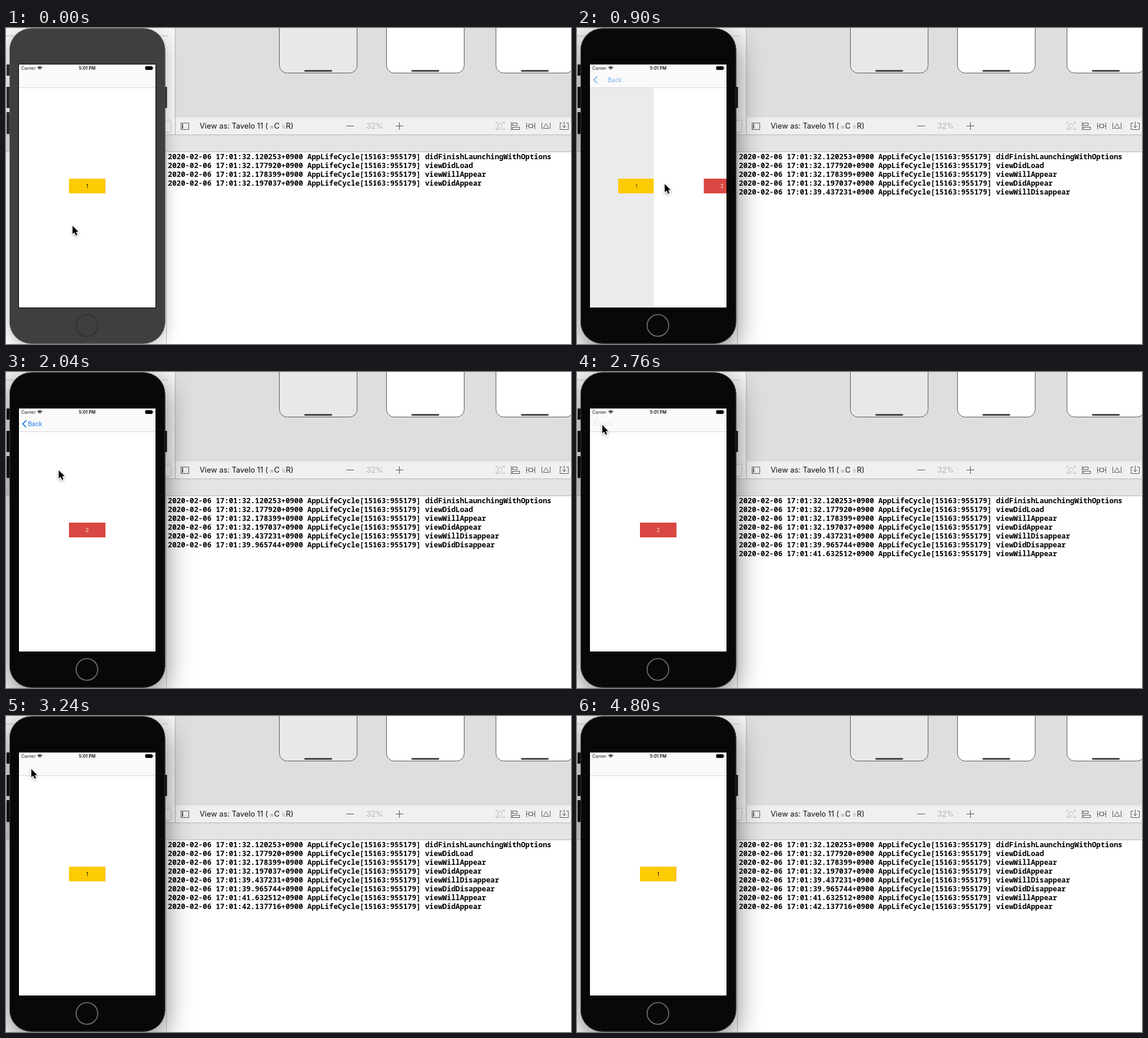
Animation of 960x537 px, one loop 4.86 s. Source, as an HTML page with a canvas:

```html
<!DOCTYPE html>
<html lang="en">
<head>
<meta charset="utf-8">
<title>View life cycle</title>
<style>
html, body { margin: 0; width: 100%; height: 100%; overflow: hidden; background: #fff; }
canvas { display: block; width: 960px; height: 537px; }
</style>
</head>
<body>
<canvas id="stage" width="960" height="537"></canvas>
<script>
const ctx = document.getElementById('stage').getContext('2d');
const LOOP = 4860, STEP = 60;
const SANS = 'Inter, Roboto, "Liberation Sans", sans-serif';
const MONO = '"Noto Sans Mono", "DejaVu Sans Mono", monospace';
const SCREEN = { x: 22, y: 62, w: 232, h: 413 };

const ACTIVATE = 660, PUSH = 808, PRESS = 2640, POP = 2788, POP_END = 3240;
const LOG = [
  [0, '32.120253', 'didFinishLaunchingWithOptions'],
  [0, '32.177920', 'viewDidLoad'],
  [0, '32.178399', 'viewWillAppear'],
  [0, '32.197037', 'viewDidAppear'],
  [780, '39.437231', 'viewWillDisappear'],
  [1260, '39.965744', 'viewDidDisappear'],
  [2760, '41.632512', 'viewWillAppear'],
  [3240, '42.137716', 'viewDidAppear']
];

const clamp = v => Math.max(0, Math.min(1, v));
const mix = (a, b, k) => a + (b - a) * k;
const smooth = k => k * k * (3 - 2 * k);

// critically damped spring, 0 to 1
function spring(ms) {
  const x = Math.max(0, ms) * 0.0194;
  return 1 - (1 + x) * Math.exp(-x);
}

function rect(x, y, w, h, color) {
  ctx.fillStyle = color;
  ctx.fillRect(x, y, w, h);
}

function round(x, y, w, h, r, fill, stroke, width = 1) {
  ctx.beginPath();
  ctx.roundRect(x, y, w, h, r);
  if (fill) { ctx.fillStyle = fill; ctx.fill(); }
  if (stroke) { ctx.strokeStyle = stroke; ctx.lineWidth = width; ctx.stroke(); }
}

function line(points, color, width = 1) {
  ctx.beginPath();
  points.forEach(([x, y], i) => i ? ctx.lineTo(x, y) : ctx.moveTo(x, y));
  ctx.strokeStyle = color;
  ctx.lineWidth = width;
  ctx.stroke();
}

function box(x, y, w, h, color) {
  ctx.strokeStyle = color;
  ctx.lineWidth = 1;
  ctx.strokeRect(x, y, w, h);
}

function text(str, x, y, font, color, align = 'left') {
  ctx.font = font;
  ctx.fillStyle = color;
  ctx.textAlign = align;
  ctx.fillText(str, x, y);
}

function icons() {
  const dark = '#5c5c5c', pale = '#b4b4b4';
  box(297.5, 161.5, 13, 11, dark);
  rect(299, 163, 2, 8, dark);

  line([[578, 166.5], [591, 166.5]], '#555');
  line([[662, 166.5], [675, 166.5]], '#555');
  line([[668.5, 160], [668.5, 173]], '#555');

  for (const sx of [-1, 1]) for (const sy of [-1, 1]) {
    const x = 839.5 + sx * 7, y = 166.5 + sy * 6;
    line([[x - sx * 4, y], [x, y], [x, y - sy * 3]], pale);
  }
  ctx.beginPath();
  ctx.arc(839.5, 166.5, 3.8, 0.9, 6.3);
  ctx.stroke();
  line([[836, 170], [834, 173]], pale);

  line([[858.5, 160], [858.5, 174]], dark);
  box(860.5, 161.5, 8, 4, dark);
  box(860.5, 168.5, 12, 4, dark);

  for (const x of [884.5, 898.5]) line([[x, 161], [x, 172]], dark);
  box(888.5, 163.5, 6, 6, dark);
  line([[885, 166.5], [888, 166.5]], dark);
  line([[895, 166.5], [898, 166.5]], dark);

  for (const x of [910.5, 924.5]) line([[x, 161], [x, 172]], dark);
  line([[913, 170.5], [917.5, 162.5], [922, 170.5], [913, 170.5]], dark);

  line([[945, 161.5], [941.5, 161.5], [941.5, 172.5], [955.5, 172.5], [955.5, 161.5], [952, 161.5]], dark);
  line([[948.5, 159], [948.5, 169]], dark);
  line([[945, 166], [948.5, 169.5], [952, 166]], dark);
}

function editor(t) {
  rect(0, 0, 960, 537, '#fff');
  rect(0, 0, 288, 181, '#f5f5f5');
  rect(0, 13, 277, 1, '#c4c4c4');
  round(240.5, 156.5, 40, 21, 3, '#f7f7f7', '#c4c4c4');
  rect(288, 0, 672, 152, '#dedede');
  rect(288, 152, 672, 29, '#f0f0f0');
  rect(287, 0, 1, 181, '#b4b4b4');

  [[464.5, '#e8e8e8'], [646.5, '#fff'], [832.5, '#fff']].forEach(([x, fill]) => {
    round(x, -40, 132, 116.5, 13, fill, '#5a5a5a');
    round(x + 42.5, 71.6, 47, 2.6, 1.3, '#333');
  });

  const label = '12.8px ' + SANS, small = '9px ' + SANS;
  text('View as: Tavelo 11 (', 329, 171, label, '#111');
  text('w', 448, 171, small, '#999');
  text('C', 455.5, 171, label, '#111');
  text('h', 469.5, 171, small, '#999');
  text('R)', 475.5, 171, label, '#111');
  text('32%', 626.5, 171, label, '#b0b0b0', 'center');
  icons();

  rect(0, 181, 960, 30, '#e4e4e4');
  rect(0, 181, 960, 1, '#b8b8b8');
  rect(0, 210, 960, 1, '#b8b8b8');
  rect(272, 211, 1, 326, '#c2c2c2');

  LOG.forEach(([at, stamp, name], i) => {
    if (t < at) return;
    text(`2020-02-06 17:01:${stamp}+0900 AppLifeCycle[15163:955179] ${name}`,
      275, 223 + i * 15, 'bold 12.35px ' + MONO, '#000');
  });
}

function phoneBody(active) {
  const body = active ? '#080808' : '#3f3f3f';
  const keys = active ? '#111' : '#2c2c2c';
  rect(1, 62, 5, 19, keys);
  rect(1, 100, 5, 36, keys);
  rect(1, 143, 5, 37, keys);
  rect(270, 100, 3.5, 36, keys);

  ctx.save();
  ctx.shadowColor = active ? 'rgba(0,0,0,.5)' : 'rgba(0,0,0,.25)';
  ctx.shadowBlur = active ? 46 : 26;
  ctx.shadowOffsetY = active ? 14 : 8;
  round(6, 0.5, 264.5, 536, 37, body);
  ctx.restore();
  round(6.5, 1, 263.5, 535, 36.5, null, active ? '#3a3a3a' : '#555');

  ctx.beginPath();
  ctx.arc(137.5, 505.5, 18.4, 0, 7);
  ctx.strokeStyle = active ? '#6a6a6a' : '#2c2c2c';
  ctx.lineWidth = active ? 1.8 : 1.2;
  ctx.stroke();
  rect(21, 61, 234, 415, '#000');
}

function button(x, fill, edge, label, color) {
  rect(x, 256, 62, 25, fill);
  rect(x + 61, 256, 1, 25, edge);
  text(label, x + 31, 271.7, '9px ' + SANS, color, 'center');
}

function statusBar() {
  text('Carrier', 26, 71.2, '7.3px ' + SANS, '#111');
  text('5:01 PM', 138, 71.2, '600 7.4px ' + SANS, '#111', 'center');
  ctx.strokeStyle = '#111';
  ctx.lineWidth = 1.3;
  for (const r of [1, 3.2, 5.4]) {
    ctx.beginPath();
    ctx.arc(57.5, 71.2, r, -Math.PI * 0.76, -Math.PI * 0.24);
    ctx.stroke();
  }
  round(236.5, 65, 12.5, 6.2, 1.6, '#000');
  rect(249.4, 67, 1, 2.2, '#333');
}

function backButton(p, alpha) {
  if (alpha < 0.01) return;
  ctx.globalAlpha = alpha;
  line([[34.6, 82.3], [28.4, 88], [34.6, 94]], '#1577e6', 1.7);
  text('Back', 37.3 + 32 * (1 - p), 91.8, '10.4px ' + SANS, '#1577e6');
  ctx.globalAlpha = 1;
}

function screen(t) {
  let p = spring(t - PUSH);
  if (t >= POP) p = 1 - spring(t - POP);
  if (t >= POP_END) p = 0;
  const { x, y, w, h } = SCREEN;

  ctx.save();
  ctx.beginPath();
  ctx.rect(x, y, w, h);
  ctx.clip();
  rect(x, y, w, h, '#fff');

  rect(x, y, w, h, `rgba(0,0,0,${0.15 * p})`);
  const ink = Math.round(150 * p);
  button(107 - 0.3 * w * p, '#fdcb02', '#f7b24c', '1', `rgb(${ink + 20},${Math.round(ink * 0.7) + 20},10)`);

  if (p > 0) {
    const shift = w * (1 - p);
    rect(x + shift, y, w, h, '#fff');
    button(107 + shift, '#d94842', '#d94842', '2', '#ffe6dc');
  }

  rect(x, y, w, 39, '#fafafa');
  rect(x, 101, w, 1, '#d6d6d6');
  backButton(p, t >= PRESS ? 0.12 * p : p);
  statusBar();
  ctx.restore();
}

function pointerAt(t) {
  if (t < 1620) {
    const k = smooth(clamp((t - 30) / 510));
    return [mix(113, 149, k), mix(336, 265, k)];
  }
  if (t < 3720) {
    const k = smooth(clamp((t - 1640) / 740));
    return [mix(149, 43, k), mix(265, 90, k)];
  }
  const k = clamp((t - 3720) / 620), e = smooth(k * 0.85) / smooth(0.85);
  return [mix(43, 185, e), mix(90, 545, e)];
}

function pointer(t) {
  const [x, y] = pointerAt(t);
  if (y > 540) return;
  ctx.save();
  ctx.translate(x, y);
  ctx.shadowColor = 'rgba(0,0,0,.35)';
  ctx.shadowBlur = 4;
  ctx.shadowOffsetY = 2;
  ctx.beginPath();
  [[0, 0], [0, 14], [3.2, 11.2], [5.6, 16.4], [8, 15.4], [5.8, 10.4], [10, 10.2]]
    .forEach(([px, py]) => ctx.lineTo(px, py));
  ctx.closePath();
  ctx.strokeStyle = '#fff';
  ctx.lineWidth = 1.8;
  ctx.stroke();
  ctx.shadowColor = 'transparent';
  ctx.fillStyle = '#000';
  ctx.fill();
  ctx.restore();
}

function draw(now) {
  const t = Math.floor(now % LOOP / STEP) * STEP;
  editor(t);
  phoneBody(t >= ACTIVATE);
  screen(t);
  pointer(t);
}

const start = performance.now();
function tick() {
  draw(performance.now() - start);
  requestAnimationFrame(tick);
}
tick();
</script>
</body>
</html>
```
